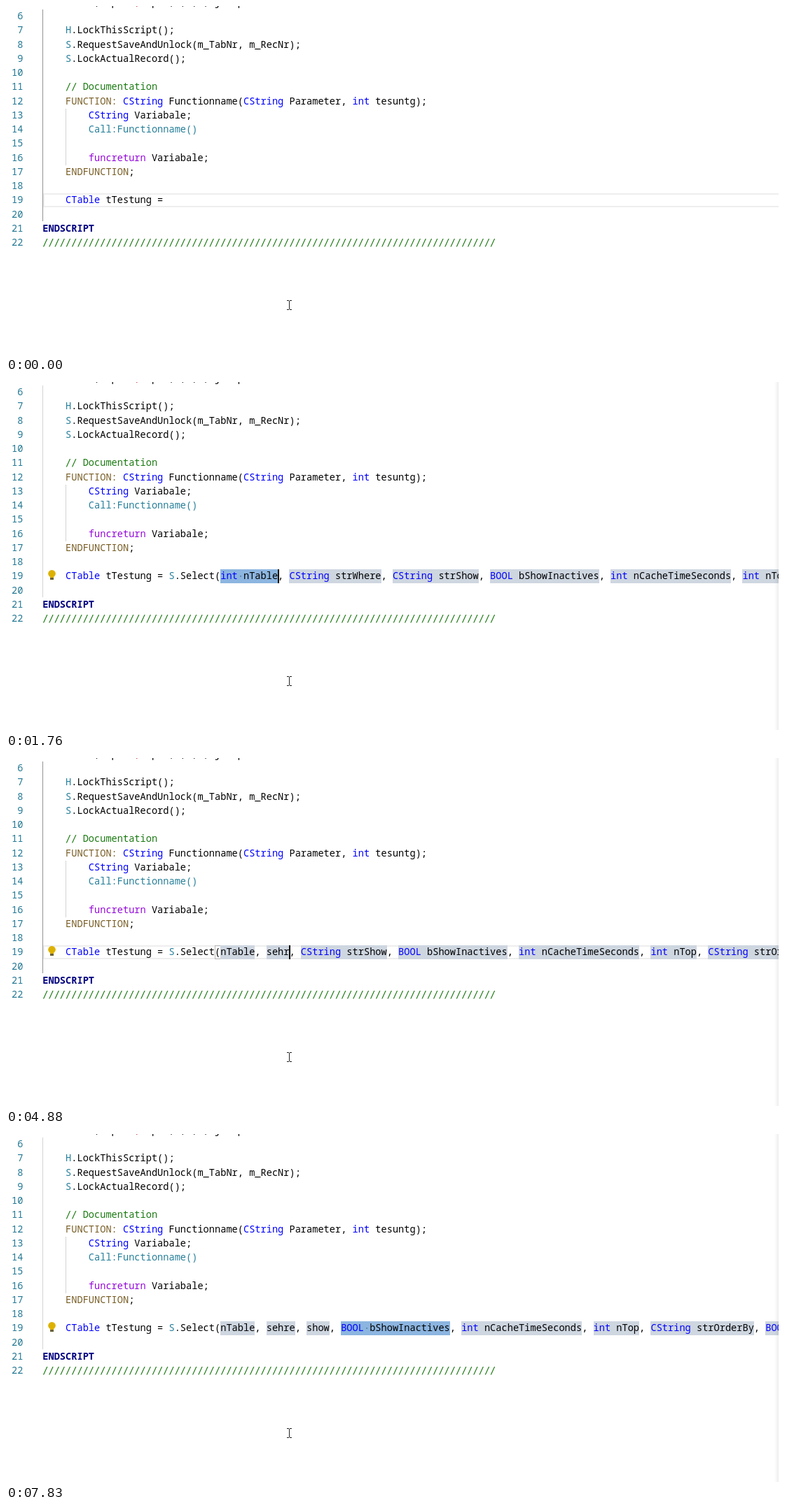
An HTML page with a canvas for the animation above (8000 ms loop, 1125 px wide and 498 px high).

```html
<!DOCTYPE html>
<html lang="en">
<head>
<meta charset="utf-8">
<title>Code completion</title>
<style>
html, body { margin: 0; width: 100%; height: 100%; overflow: hidden; background: #fff; }
canvas { display: block; }
</style>
</head>
<body>
<canvas id="stage" width="1125" height="498"></canvas>
<script>
const g = document.getElementById('stage').getContext('2d');
const LOOP = 8000, X0 = 52.3, CW = 8.19, LH = 20.25, RIGHT = 1103, ROW = 268, POP = 288;
const MONO = '13.65px "Noto Sans Mono", monospace';
const SLASH = '13.65px "DejaVu Sans Mono", monospace';
const SANS = '14.4px "Open Sans", sans-serif';
const K = '#000', BLUE = '#0000ff', TEAL = '#267f99', OLIVE = '#795e26',
      GREEN = '#1b7a12', PURPLE = '#9408dc', NAVY = '#000080';

// Tokens per line: indent, then text and colour pairs
const LINES = {
  5: [9, ',  p', K, '   ,', '#a31515', '  p', K, '  , , , , j   p', K],
  7: [4, 'H', TEAL, '.LockThisScript();', K],
  8: [4, 'S', TEAL, '.RequestSaveAndUnlock(m_TabNr, m_RecNr);', K],
  9: [4, 'S', TEAL, '.LockActualRecord();', K],
  11: [4, '// Documentation', GREEN],
  12: [4, 'FUNCTION:', OLIVE, ' CString', BLUE, ' Functionname(', K, 'CString', BLUE,
       ' Parameter, ', K, 'int', BLUE, ' tesuntg);', K],
  13: [8, 'CString', BLUE, ' Variabale;', K],
  14: [8, 'Call:Functionname()', TEAL],
  16: [8, 'funcreturn', PURPLE, ' Variabale;', K],
  17: [4, 'ENDFUNCTION', OLIVE, ';', K],
  19: [4, 'CTable', BLUE, ' tTestung = ', K],
  22: [0, '/'.repeat(79), GREEN]
};

const PARAMS = ['int nTable', 'CString strWhere', 'CString strShow', 'BOOL bShowInactives',
  'int nCacheTimeSeconds', 'int nTop', 'CString strOrderBy', 'BOOL bDescending'];
const VALUES = ['nTable', 'sehre', 'show'];

// Time and text typed before the completion is accepted
const TYPING = [[0, ''], [370, 'S'], [620, 'S.'], [910, 'S.S'], [1070, 'S.Se'], [1130, 'S.Sel']];
// Time, active parameter and characters typed into it (0 = still selected)
const FILLING = [[1610, 0, 0], [2620, 0, 1], [2840, 0, 2], [2920, 0, 3], [3000, 0, 4],
  [3160, 0, 5], [3270, 0, 6], [3490, 1, 0], [4030, 1, 1], [4720, 1, 2], [4800, 1, 3],
  [4880, 1, 4], [5040, 1, 5], [6120, 2, 0], [6750, 2, 1], [6810, 2, 2], [6970, 2, 4], [7290, 3, 0]];
const CARET_OFF = [[0, 70], [2250, 2620], [4560, 4720], [5430, 5970], [6590, 6750], [7830, LOOP]];
const BRACKET = [[2680, 3580], [4120, 6120], [6810, 7400]];

const CLASSES = ['S', 'SCRIPT', 'ENDSCRIPT', 'CString', 'CTableSet', 'ShowMessage'];
const METHODS = ['AddRecord', 'CloseRecord', 'CopyRecord', 'DeleteRecord', 'ExtendSelect',
  'GetActualRecord', 'GetActualRecordSelection', 'GetRecordCount', 'GetSelectedRecords',
  'GetTextSelection', 'GetTextSelText'];
const MATCHES = ['Select', 'SelectMultipleCachedRecords', 'SelectMultipleRecords', 'SelectRecord',
  'SelectRecordSpecial', 'SetLocaleParameterString', 'ExtendSelect', 'GetActualRecordSelection',
  'GetSelectedRecords', 'GetTextSelection', 'GetTextSelText'];

const colX = col => X0 + col * CW;
const baseY = n => 19.15 + (n - 6) * LH;
const within = (spans, t) => spans.some(([a, b]) => t >= a && t < b);
const stepAt = (steps, t) => steps.filter(s => s[0] <= t).pop();

function box(x, y, w, h, color) {
  g.fillStyle = color;
  g.fillRect(x, y, w, h);
}

function frame(x, y, w, h, fill, line) {
  box(x, y, w, h, line);
  box(x + 1, y + 1, w - 2, h - 2, fill);
}

// One glyph per cell keeps the column grid exact
function mono(text, x, y, color, bold) {
  g.fillStyle = color;
  [...text].forEach((ch, i) => {
    if (ch === ' ') return;
    g.font = (bold ? 'bold ' : '') + (ch === '/' ? SLASH : MONO);
    g.fillText(ch, x + i * CW, y);
  });
}

function tokens(col, list, y) {
  for (let i = 0; i < list.length; i += 2) {
    mono(list[i], colX(col), y, list[i + 1]);
    col += list[i].length;
  }
  return col;
}

function polyline(points, close) {
  g.beginPath();
  points.forEach(([x, y]) => g.lineTo(x, y));
  if (close) g.closePath();
}

function drawCode(selecting) {
  for (let n = 6; n <= 22; n++) {
    const label = String(n);
    mono(label, 24.4 - label.length * CW, baseY(n), '#237893');
  }
  box(52, 5, 1, 303, selecting ? '#d3d3d3' : '#939393');
  box(85, 147, 1, 81, '#d3d3d3');
  for (const n in LINES) tokens(LINES[n][0], LINES[n].slice(1), baseY(+n));
  mono('ENDSCRIPT', X0, baseY(21), NAVY, true);
}

function drawParams(step, t) {
  const [, active, count] = step, y = baseY(19);
  let col = tokens(22, ['S', TEAL, '.Select(', K], y), caret = col;
  if (within(BRACKET, t)) {
    g.strokeStyle = '#b9b9b9';
    g.lineWidth = 1;
    g.strokeRect(Math.floor(colX(30)) + 0.5, ROW + 0.5, 8, 19);
  }
  PARAMS.forEach((param, i) => {
    const filled = i < active || (i === active && count);
    const text = i < active ? VALUES[i] : filled ? VALUES[i].slice(0, count) : param;
    const selected = i === active && !filled;
    const x = Math.round(colX(col)), w = Math.round(colX(col + text.length)) - x;
    box(x, ROW, w, 20, selected ? '#8cb5e0' : '#ced6e0');
    const split = filled ? 0 : text.indexOf(' ');
    tokens(col, [text.slice(0, split), BLUE, text.slice(split), K], y);
    if (selected) box(colX(col + split) + 3.3, 277, 1.8, 1.8, '#5f7f9f');
    col += text.length;
    if (i === active) caret = col;
    mono(',', colX(col), y, K);
    col += 2;
  });
  return caret;
}

function drawBulb() {
  g.fillStyle = '#ddb100';
  g.beginPath();
  g.arc(65.5, 274.2, 5.3, 0, 7);
  g.fill();
  box(63, 277, 5, 3, '#ddb100');
  box(63, 280, 5, 3, '#6b6236');
}

function drawCube(x, y) {
  const pts = [[0, -6.5], [6, -3.5], [6, 3.5], [0, 6.5], [-6, 3.5], [-6, -3.5]]
    .map(([a, b]) => [x + a, y + b]);
  g.strokeStyle = '#652d90';
  g.lineWidth = 1.1;
  polyline(pts, true);
  g.stroke();
  polyline([pts[5], [x, y], pts[1]]);
  g.stroke();
  polyline([[x, y], pts[3]]);
  g.stroke();
}

// Positions of the letters that match the query
function matched(name, query) {
  const at = name.indexOf(query);
  if (at >= 0) return [...query].map((_, i) => at + i);
  let from = 0;
  return [...query].map(ch => {
    const i = name.toLowerCase().indexOf(ch.toLowerCase(), from);
    from = i + 1;
    return i;
  });
}

function drawDetails(x, name) {
  frame(x, POP, 351, 67, '#f3f3f3', '#c8c8c8');
  g.fillStyle = '#e3e3e3';
  g.beginPath();
  g.roundRect(x + 7, 295, 117, 18, 3);
  g.fill();
  mono('return CTable', x + 12, 310, '#222');
  g.font = SANS;
  g.fillText(name, x + 6, 346);
  g.strokeStyle = '#333';
  g.lineWidth = 1.1;
  for (const s of [-1, 1]) {
    polyline([[x + 334, 298.5 - 4 * s], [x + 342, 298.5 + 4 * s]]);
    g.stroke();
  }
}

function drawPopup(x, typed, details) {
  const query = typed.split('.').pop();
  const items = typed === 'S' ? CLASSES : query ? MATCHES : METHODS;
  const long = items.length > 6;
  frame(x, POP, 350, long ? 240 : 122, '#f3f3f3', '#c8c8c8');
  box(x + 1, POP + 1, 348, 20, '#d6ebff');
  if (long) {
    box(x + 1, 410.5, 348, 20, '#e8e8e8');
    box(x + 339, POP + 1, 11, 62, '#b4b4b4');
  }
  items.forEach((name, i) => {
    const y = 299 + i * LH, hits = matched(name, query);
    drawCube(x + 11.5, y);
    [...name].forEach((ch, j) => {
      const hit = hits.includes(j);
      mono(ch, x + 24 + j * CW, y + 5, hit ? '#0066bf' : '#222', hit);
    });
  });
  if (details) drawDetails(x + 351, items[0]);
  return long;
}

function drawBeam() {
  g.strokeStyle = '#222';
  g.lineWidth = 1;
  polyline([[404.5, 422], [404.5, 434]]);
  g.stroke();
  for (const y of [421.5, 434.5]) {
    polyline([[401, y], [404, y]]);
    g.stroke();
    polyline([[405, y], [408, y]]);
    g.stroke();
  }
}

function drawHand() {
  polyline([[402.5, 429], [403.5, 428], [404.5, 428], [405.5, 429], [405.5, 434], [408, 434],
    [410.5, 435], [412.5, 436], [413, 437.5], [413, 441], [411.5, 444], [411.5, 446.5],
    [404.5, 446.5], [404, 444], [400, 439.5], [399.5, 437.5], [401, 437], [402.5, 438.5]], true);
  g.fillStyle = '#fff';
  g.fill();
  g.strokeStyle = '#222';
  g.lineWidth = 1;
  g.stroke();
}

function draw(t) {
  const step = stepAt(FILLING, t), typed = stepAt(TYPING, t)[1];
  const selecting = step && !step[2];
  box(0, 0, 1125, 498, '#fff');
  g.save();
  g.beginPath();
  g.rect(0, 0, RIGHT, 498);
  g.clip();
  if (!selecting) {
    g.strokeStyle = '#eee';
    g.lineWidth = 2;
    g.strokeRect(54, ROW + 1, 1100, 18);
  }
  drawCode(selecting);
  let caret;
  if (step) caret = drawParams(step, t);
  else caret = tokens(22, [typed.slice(0, 1), TEAL, typed.slice(1), K], baseY(19));
  if (t >= 1390) drawBulb();
  const caretX = Math.round(colX(caret));
  if (!within(CARET_OFF, t)) box(caretX, ROW, 2, 20, K);
  if (step) {
    const shade = g.createLinearGradient(1097, 0, RIGHT, 0);
    shade.addColorStop(0, 'rgba(0,0,0,0)');
    shade.addColorStop(1, 'rgba(0,0,0,0.07)');
    box(1097, 0, 6, 498, shade);
  }
  g.restore();

  const open = within([[430, 620], [680, 1610]], t);
  const overList = open && drawPopup(caretX + 1, typed, !within([[680, 750]], t));
  overList ? drawHand() : drawBeam();
}

function tick() {
  draw(performance.now() % LOOP);
  requestAnimationFrame(tick);
}
tick();
</script>
</body>
</html>
```
